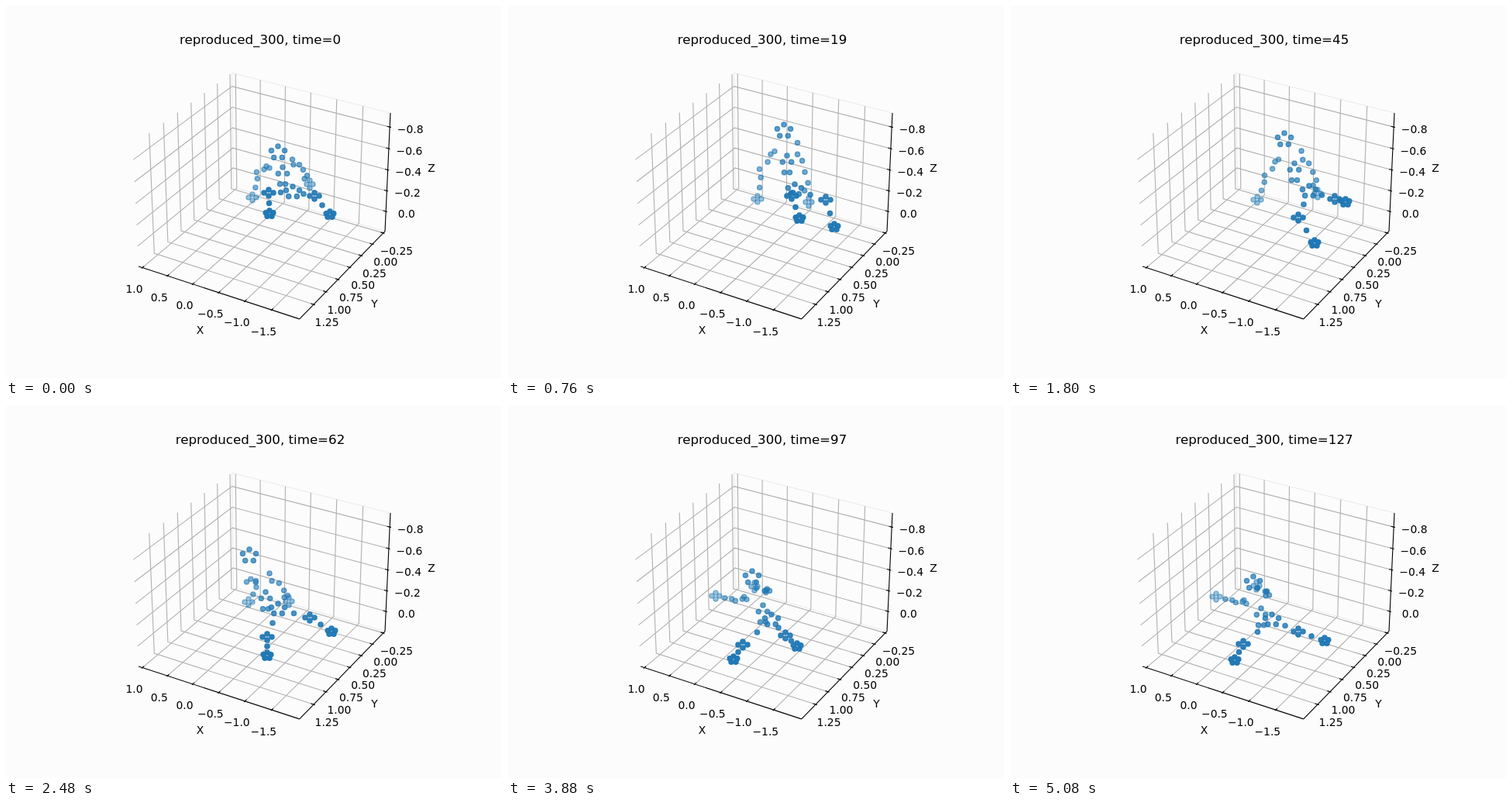
Animation, 640 px wide and 480 px high, one loop 5120 ms. Source, as an HTML page:

```html
<!DOCTYPE html>
<html lang="en">
<head>
<meta charset="utf-8">
<title>3D marker scatter</title>
<style>
  html, body { margin: 0; width: 100%; height: 100%; overflow: hidden; background: #fcfcfc; }
  svg { display: block; width: 640px; height: 480px; }
  text { font: 13.89px "DejaVu Sans", sans-serif; text-anchor: middle; }
  #title { font-size: 16.67px; }
  path { fill: none; stroke-width: 1.11; }
  .pane { stroke: #ececec; }
  .grid { stroke: #b0b0b0; }
  .axis { stroke: #000; }
  circle { fill: #1f77b4; stroke: #1f77b4; stroke-width: 1.39; }
</style>
</head>
<body>
<svg id="stage" viewBox="0 0 640 480"><text id="title" x="328" y="49"></text></svg>
<script>
const STEP = 40, STEPS = 128;
const KEYS = [0, 19, 45, 62, 76, 97, 127];
const stage = document.getElementById("stage");
const title = document.getElementById("title");

function add(tag, attrs, content = "") {
  const node = document.createElementNS(stage.namespaceURI, tag);
  for (const name in attrs) node.setAttribute(name, attrs[name]);
  node.textContent = content;
  return stage.appendChild(node);
}

// Perspective camera at elevation 30, azimuth -60; coordinates are 0..1 in the box.
function project([fx, fy, fz]) {
  const x = (fx - 0.5) * 1.1905, y = (fy - 0.5) * 1.1905, z = (fz - 0.5) * 0.8929;
  const right = 0.866 * x + 0.5 * y;
  const up = -0.25 * x + 0.433 * y + 0.866 * z;
  const depth = 10 - (0.433 * x - 0.75 * y + 0.5 * z);
  return [333 + 1997.8 * right / depth, 237.4 - 1997.8 * up / depth];
}

function line(kind, ...corners) {
  const points = corners.map(c => project(c).map(v => v.toFixed(2)).join(" "));
  add("path", { class: kind, d: "M" + points.join("L") });
}

function label(content, x, y) {
  add("text", { x: x.toFixed(2), y: Math.round(y + 5) }, content);
}

const axes = [
  { name: "X", at: [250.5, 418], first: 1, step: -0.5, count: 6, digits: 1, from: 0.0245, gap: 0.162,
    shift: [-10.5, 27.5], point: f => [f, 0, 0], tick: (f, d) => [f, d, 0],
    grid: f => [[f, 0, 0], [f, 1, 0], [f, 1, 1]], ends: [[0, 0, 0], [1, 0, 0]] },
  { name: "Y", at: [475.5, 384], first: 1.25, step: -0.25, count: 7, digits: 2, from: 0.154, gap: 0.1375,
    shift: [17, 23], point: f => [1, f, 0], tick: (f, d) => [1 - d, f, 0],
    grid: f => [[1, f, 0], [0, f, 0], [0, f, 1]], ends: [[1, 0, 0], [1, 1, 0]] },
  { name: "Z", at: [549, 209], first: 0, step: -0.2, count: 5, digits: 1, from: 0.174, gap: 0.178,
    shift: [26.5, 3], point: f => [1, 1, f], tick: (f, d) => [1 - d, 1, f],
    grid: f => [[0, 0, f], [0, 1, f], [1, 1, f]], ends: [[1, 1, 0], [1, 1, 1]] }
];

function eachTick(axis, draw) {
  for (let i = 0; i < axis.count; i++) draw(axis.from + i * axis.gap, axis.first + i * axis.step);
}

line("pane", [1, 1, 0], [0, 1, 0], [0, 1, 1], [1, 1, 1]);
for (const axis of axes) eachTick(axis, f => line("grid", ...axis.grid(f)));
for (const axis of axes) {
  line("axis", ...axis.ends);
  eachTick(axis, (f, value) => {
    line("axis", axis.tick(f, 0.0167), axis.tick(f, -0.0083));
    const [x, y] = project(axis.point(f));
    label(value.toFixed(axis.digits).replace("-", "\u2212"), x + axis.shift[0], y + axis.shift[1]);
  });
  label(axis.name, ...axis.at);
}

// Smooth curve through the key values that never overshoots them.
function curve(values) {
  const slopes = values.slice(1).map((v, i) => (v - values[i]) / (KEYS[i + 1] - KEYS[i]));
  const tangents = values.map((_, i) => {
    const a = slopes[i - 1], b = slopes[i];
    if (a === undefined || b === undefined) return a ?? b;
    return a * b <= 0 ? 0 : 2 * a * b / (a + b);
  });
  return frame => {
    let i = 0;
    while (i < KEYS.length - 2 && frame >= KEYS[i + 1]) i++;
    const span = KEYS[i + 1] - KEYS[i], t = (frame - KEYS[i]) / span, s = 1 - t;
    return s * s * (1 + 2 * t) * values[i] + t * t * (3 - 2 * t) * values[i + 1]
      + span * t * s * (s * tangents[i] - t * tangents[i + 1]);
  };
}

// A joint is a function from frame to [x, y].
function joint(...points) {
  const x = curve(points.map(p => p[0])), y = curve(points.map(p => p[1]));
  return frame => [x(frame), y(frame)];
}

function between(a, b, t = 0.5, dx = 0, dy = 0) {
  return frame => {
    const [ax, ay] = a(frame), [bx, by] = b(frame);
    return [ax + (bx - ax) * t + dx, ay + (by - ay) * t + dy];
  };
}

const head = joint([351, 189], [356, 161], [354, 172], [314, 193], [317, 213], [315, 221], [314, 228]);
const chest = joint([357, 220], [360, 205], [367, 215], [335, 252], [330, 264], [329, 269], [324, 273]);
const hips = joint([370, 240], [370, 237], [386, 239], [351, 262], [342, 274], [340, 276], [338, 276]);
const leftElbow = joint([324, 213], [325, 210], [329, 218], [324, 226], [300, 252], [294, 250], [292, 252]);
const leftHand = joint([318, 247], [322, 249], [319, 250], [313, 253], [274, 258], [268, 245], [266, 246]);
const rightHand = joint([392, 230], [388, 253], [397, 242], [365, 252], [317, 230], [318, 233], [318, 232]);
const leftKnee = joint([339, 241], [366, 245], [372, 273], [337, 298], [324, 304], [303, 308], [301, 307]);
const leftFoot = joint([340, 268], [376, 274], [393, 306], [337, 322], [321, 327], [291, 327], [290, 328]);
const rightKnee = joint([398, 245], [410, 250], [419, 249], [392, 273], [341, 301], [358, 296], [372, 291]);
const rightFoot = joint([418, 269], [421, 285], [433, 253], [420, 291], [341, 322], [373, 310], [406, 303]);
const leftShoulder = between(head, chest, 0.5, -10, 2);
const rightShoulder = between(head, chest, 0.5, 13, -5);
const rightElbow = between(chest, rightHand, 0.5, 8, -13);

const markers = [];

function marker(place, opacity) {
  const dot = add("circle", { r: 3.1, "fill-opacity": opacity, "stroke-opacity": opacity });
  markers.push({ place, dot });
}

// Markers on an ellipse around a joint, the first one on top.
function ring(center, count, rx, ry, opacity) {
  for (let i = 0; i < count; i++) {
    const angle = 2 * Math.PI * i / count;
    marker(between(center, center, 0, rx * Math.sin(angle), -ry * Math.cos(angle)), opacity);
  }
}

let seed = 7;
function jitter(size) {
  seed = seed * 16807 % 2147483647;
  return (seed / 2147483647 - 0.5) * 2 * size;
}

// Markers strung loosely from the shoulder over the elbow to the wrist.
function arm(shoulder, elbow, hand, opacity) {
  for (let i = 0; i < 6; i++) {
    const t = i * 0.32;
    const [a, b, part] = t < 1 ? [shoulder, elbow, t] : [elbow, hand, t - 1];
    marker(between(a, b, part, jitter(4), jitter(3)), opacity);
  }
}

function leg(knee, foot, opacity) {
  marker(between(hips, knee), opacity - 0.1);
  ring(knee, 4, 6, 4, opacity);
  marker(between(knee, foot), opacity);
  ring(foot, 5, 5, 4, opacity + 0.05);
}

arm(leftShoulder, leftElbow, leftHand, 0.58);
ring(leftHand, 4, 5, 4, 0.46);
arm(rightShoulder, rightElbow, rightHand, 0.63);
ring(rightHand, 4, 4, 5, 0.5);
ring(head, 5, 9, 8, 0.72);
ring(chest, 5, 6, 12, 0.7);
ring(hips, 5, 9, 7, 0.78);
leg(leftKnee, leftFoot, 0.94);
leg(rightKnee, rightFoot, 0.9);

let shown = -1;

function render(frame) {
  if (frame === shown) return;
  shown = frame;
  title.textContent = `reproduced_300, time=${frame}`;
  for (const { place, dot } of markers) {
    const [x, y] = place(frame);
    dot.setAttribute("cx", x.toFixed(2));
    dot.setAttribute("cy", y.toFixed(2));
  }
}

const start = performance.now();
function tick() {
  render(Math.floor((performance.now() - start) / STEP) % STEPS);
  requestAnimationFrame(tick);
}
render(0);
requestAnimationFrame(tick);
</script>
</body>
</html>
```
